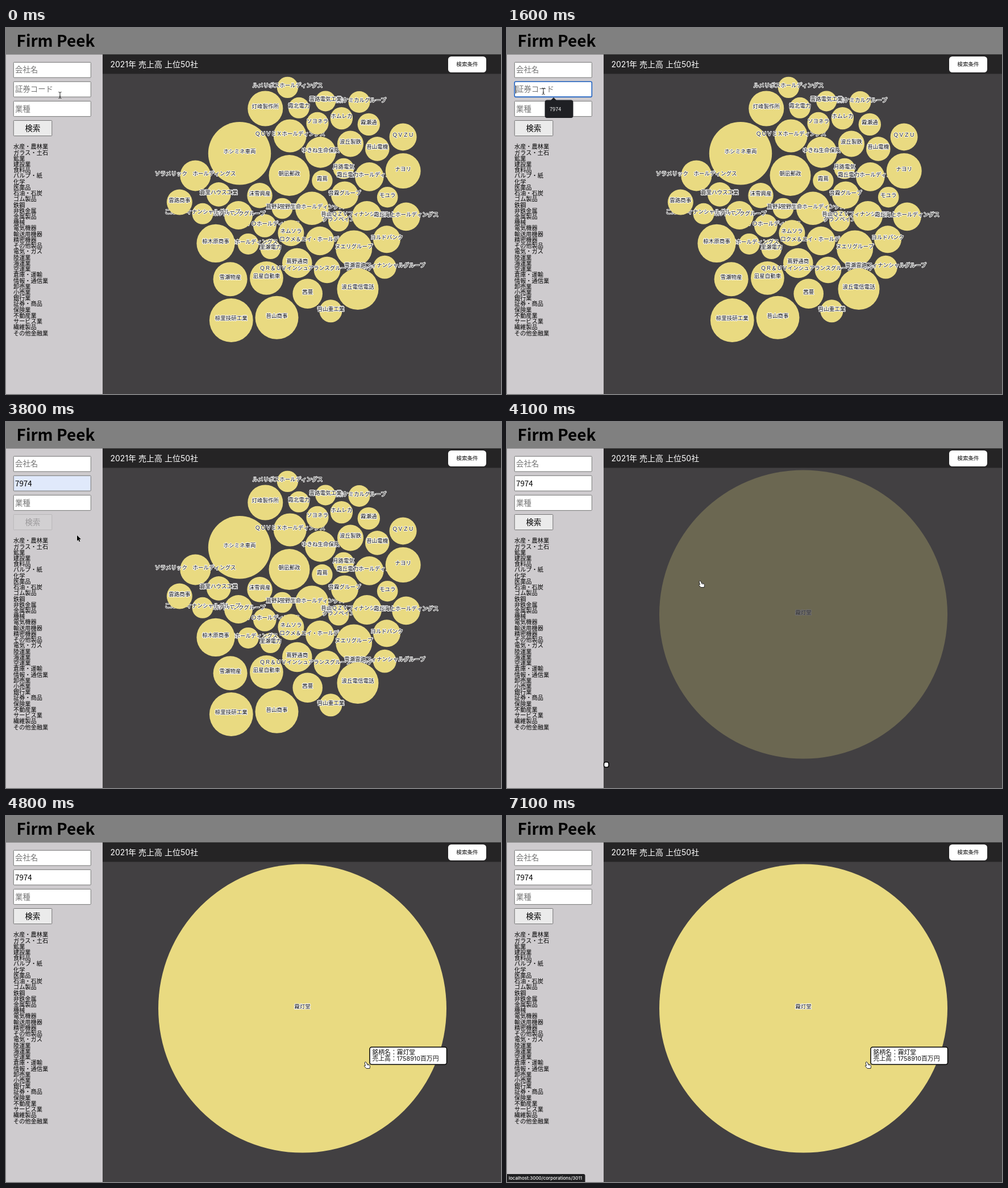
These frames come from a looping animation (871x643 px, 7200 ms). An HTML page with a canvas:

```html
<!DOCTYPE html>
<html lang="ja">
<head>
<meta charset="utf-8">
<style>
html, body { margin: 0; width: 100%; height: 100%; overflow: hidden; }
canvas { display: block; }
</style>
</head>
<body>
<canvas id="stage" width="871" height="643"></canvas>
<script>
const ctx = document.getElementById('stage').getContext('2d');
const LOOP = 7200, LOADED = 3950;
const CJK = '"Noto Sans CJK JP", "Noto Sans CJK", sans-serif';
const LATIN = 'Inter, ' + CJK;
const BACK = '#424042';
const FOUND = '霧灯堂';

const industries = ('水産・農林業 ガラス・土石 鉱業 建設業 食料品 パルプ・紙 化学 医薬品 石油・石炭 ゴム製品 鉄鋼 ' +
  '非鉄金属 金属製品 機械 電気機器 輸送用機器 精密機器 その他製品 電気・ガス 陸運業 海運業 空運業 倉庫・運輸 ' +
  '情報・通信業 卸売業 小売業 銀行業 証券・商品 保険業 不動産業 サービス業 繊維製品 その他金融業').split(' ');

// x y radius name, in paint order
const bubbles = `411 220.3 55.2 ホシミネ車両
396.3 513.5 38.4 椋里技研工業
476.5 508.8 38 苔山商事
498.5 259 36 朝凪郵政
456.3 141.5 31 灯峰製作所
499.7 189.4 29 ＱＵＶＥＸホールディングス
553.3 218.4 27.3 ゆきね生命保険
333.3 259.4 27 ソラメリック　ホールディングス
495.4 104.4 18.7 ルメリポスホールディングス
515.4 140.3 18.5 霞北電力
621.5 130 19 星葉ケミカルグループ
562.2 128.4 18 雲路電気工業
548 167.4 19.6 ソヨネラ
590.4 158.6 19.7 ホムレカ
638.3 169.4 19.7 霧瀬通
606 203.4 23 波丘製鉄
653.3 212.4 21.3 苔山電機
698.6 191.4 24 ＱＶＺＵ
594 247 18.3 月路電気
639.3 261.4 25.3 霜丘電力ホールディングス
698.7 251 31 ナヨリ
556.4 268.2 18.2 霞蔦
374.3 292.4 21.3 蒼里ハウス工業
446.5 294.2 22.2 沫雪興産
486 317 18.3 蔦野薬品工業
538.3 316.7 29.3 蛍野生命ホールディングス
596 293.4 24 音霧グループ
671.2 297.2 18.3 モユラ
455.3 347.3 20.4 ＱＲＥＶＯホールディングス
409 329 25 ヨルドバンクグループ
346 326.3 18.5 こだちフィナンシャルグループ
305.3 306 22.5 雲路商事
585.3 339.3 18.3 グラノペイン
635 330 26 苔山ＱＺＶフィナンシャル・グループ
704 331.4 24.8 霜丘海上ホールディングス
501.4 360.3 23 ネムソラ
465.4 388.3 17.8 里瀬電力
426.2 379.4 18.5 蔓里葉ホールディングス
369 378.4 33.6 椋木原商事
552.4 374 25.3 ロクメ＆ユイ・ホールディングス
612.2 387.4 32 ヌエリグループ
670 371.3 24 ヨルドバンク
394.6 441.2 30 雪瀬物産
458.4 439.4 29.4 凪星自動車
512.3 413 26.3 蔦野通商
565 425 23.3 ＱＲ＆ＵＶインシュアランスグループホールディングス
619 458.6 36.5 波丘電信電話
666.4 420.2 20.4 雪瀬雲路フィナンシャルグループ
530.7 466.8 26.3 茜蔓
571.4 497.2 20 苔山重工業`.split('\n').map(line => {
  const [x, y, r, name] = line.split(' ');
  return { x: +x, y: +y, r: +r, name };
});

const cursorPath = [
  [0, 95, 118], [800, 95, 118], [1300, 64, 111], [1700, 64, 111], [2200, 97, 143], [2600, 97, 143],
  [3100, 50, 178], [3400, 50, 178], [3800, 125, 199], [4100, 342, 285], [4700, 635, 438], [LOOP, 635, 438]
];

function cursorAt(t) {
  const i = cursorPath.findIndex(p => p[0] > t);
  const [t0, x0, y0] = cursorPath[i - 1], [t1, x1, y1] = cursorPath[i];
  const u = (t - t0) / (t1 - t0), k = u * u * (3 - 2 * u);
  return [x0 + (x1 - x0) * k, y0 + (y1 - y0) * k];
}

function rect(x, y, w, h, fill) {
  ctx.fillStyle = fill;
  ctx.fillRect(x, y, w, h);
}

function box(x, y, w, h, radius, fill, stroke, line = 1) {
  ctx.beginPath();
  ctx.roundRect(x, y, w, h, radius);
  ctx.fillStyle = fill;
  ctx.fill();
  if (!stroke) return;
  ctx.strokeStyle = stroke;
  ctx.lineWidth = line;
  ctx.stroke();
}

// y is the middle of the glyphs
function text(str, x, y, size, color, { weight = 400, family = CJK, align = 'left', halo } = {}) {
  ctx.font = `${weight} ${size}px ${family}`;
  ctx.textAlign = align;
  const base = y + size * 0.37;
  if (halo) {
    ctx.strokeStyle = halo;
    ctx.lineWidth = 2;
    ctx.lineJoin = 'round';
    ctx.strokeText(str, x, base);
  }
  ctx.fillStyle = color;
  ctx.fillText(str, x, base);
}

function bubble({ x, y, r, name }) {
  ctx.beginPath();
  ctx.arc(x, y, r, 0, Math.PI * 2);
  ctx.fillStyle = '#e9da81';
  ctx.fill();
  text(name, x, y - 3.7, 9.5, '#111', { align: 'center', halo: '#fff' });
}

function field(y, placeholder) {
  box(13.3, y + 0.3, 136, 26.8, 1, '#fff', '#767676');
  text(placeholder, 16, y + 13.5, 13.4, '#757575');
}

function codeField(t) {
  const filled = t >= 2000, focused = t >= 1400 && t < 3300;
  const fill = filled && t < LOADED ? '#e0e9fb' : '#fff';
  box(13.3, 94.3, 136, 26.8, focused ? 2 : 1, fill, focused ? '#1c5fc0' : '#767676', focused ? 1.6 : 1);
  if (!filled) text('証券コード', 16, 107.5, 13.4, '#757575');
  else if (t < 2600) text('7974', 16, 109.5, 9.2, '#111');
  else text('7974', 16, 107.8, 13.4, '#000', { weight: 500 });
  if (focused && !filled) rect(15, 101, 1, 14, '#000');
}

function sidebar(t) {
  rect(0, 46.5, 170, 597, '#cecbce');
  field(60, '会社名');
  codeField(t);
  field(128.3, '業種');
  const busy = t >= 3400 && t < LOADED;
  box(13.3, 162.5, 67.5, 27, 1, busy ? '#d2d0d2' : '#ebebeb', busy ? '#b9b7b9' : '#767676');
  text('検索', 47, 176.3, 13.4, busy ? '#9b999b' : '#000', { align: 'center', weight: 500 });
  industries.forEach((name, i) => text(name, 13, 208.5 + i * 10.23, 10.2, '#000', { weight: 500 }));
  if (t >= 1500 && t < 2600) suggestion(t >= 2000);
}

function suggestion(hover) {
  ctx.beginPath();
  ctx.moveTo(76, 128);
  ctx.lineTo(82, 122);
  ctx.lineTo(88, 128);
  ctx.fillStyle = '#1f2024';
  ctx.fill();
  box(67, 127, 49, 30.5, 3, hover ? '#2b2c30' : '#1f2024', '#1f2024');
  text('7974', 75, 143, 9.2, '#f2f2f2');
}

function result(t, [x, y]) {
  bubble({ x: 521.5, y: 338, r: 253.5, name: FOUND });
  // a veil of background colour fades the bubble and its label as one
  ctx.globalAlpha = Math.max(0, 1 - (t - LOADED) / 600);
  rect(170, 81, 701, 562, BACK);
  ctx.globalAlpha = 1;
  if (t < 4200) {
    box(170.5, 597.5, 8.5, 9, 3, '#fff', '#000', 1.5);
    return;
  }
  box(x + 5, y - 32, 135.5, 30.5, 3.5, '#fff', '#000', 1.5);
  text('銘柄名：' + FOUND, x + 9.5, y - 22.5, 10.8, '#111', { family: LATIN });
  text('売上高：1758910百万円', x + 9.5, y - 11.5, 10.8, '#111', { family: LATIN });
}

const arrow = new Path2D('M0 0V10L2.3 7.9L3.9 11.4L5.5 10.7L4 7.3H7.2Z');
const hand = new Path2D('M-3.5-5.5Q-2-7-1-5L.5-2Q2-3 2.6-1.4Q4-2 4.4-.4Q5.6-.4 5.5 1.5L5 5.5H-1L-4.8 1.2Q-4.5-.5-2.5.8L-3.9-4ZM.5-2L1.2 0M2.6-1.4L3 .4');
const beam = new Path2D('M-2.5-5.5Q0-5.5 0-4Q0-5.5 2.5-5.5M0-4V4M-2.5 5.5Q0 5.5 0 4Q0 5.5 2.5 5.5M-1.3 2H1.3');

function cursor(t, [x, y]) {
  ctx.save();
  ctx.translate(x, y);
  ctx.lineWidth = 1;
  ctx.strokeStyle = '#222';
  if (t < 2000) {
    ctx.stroke(beam);
  } else if (t < 2600 || t >= LOADED) {
    ctx.fillStyle = '#fff';
    ctx.fill(hand);
    ctx.stroke(hand);
  } else {
    ctx.strokeStyle = '#fff';
    ctx.fillStyle = '#000';
    ctx.stroke(arrow);
    ctx.fill(arrow);
  }
  ctx.restore();
}

function draw(t) {
  const pos = cursorAt(t);
  rect(0, 0, 871, 643, BACK);
  rect(0, 0, 871, 46.5, '#808080');
  text('Firm Peek', 18.5, 23, 28, '#000', { weight: 700 });
  rect(170, 46.5, 701, 34, '#252425');
  text('2021年 売上高 上位50社', 183.5, 63.5, 14, '#fff', { family: LATIN });
  box(778, 50, 67, 28, 5.5, '#fff');
  text('検索条件', 811.5, 63.5, 9.6, '#111', { align: 'center', weight: 500 });
  sidebar(t);
  if (t < LOADED) bubbles.forEach(bubble);
  else result(t, pos);
  if (t >= 5000) {
    box(-1, 629, 138.5, 15, [0, 3, 0, 0], '#1f1f21');
    text('localhost:3000/corporations/3011', 3, 636, 8, '#fff', { family: LATIN, weight: 500 });
  }
  cursor(t, pos);
}

// the picture advances in steps of 100 ms
function tick(now) {
  draw(Math.floor(now % LOOP / 100) * 100);
  requestAnimationFrame(tick);
}
requestAnimationFrame(tick);
</script>
</body>
</html>
```
